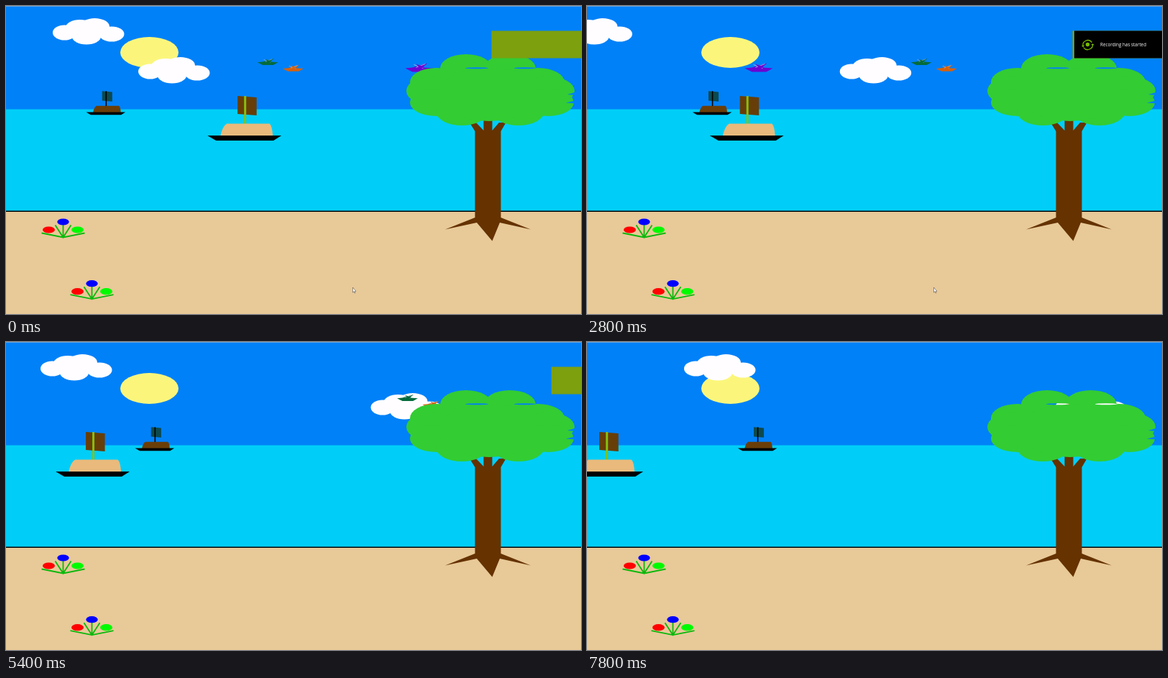
Write an HTML page that moves like this. It is 800 by 428 pixels and loops after 8000 ms.

```html
<!DOCTYPE html>
<html lang="en">
<head>
<meta charset="utf-8">
<title>Seaside</title>
<style>
  html, body { margin: 0; width: 100%; height: 100%; overflow: hidden; }
  svg { display: block; width: 100vw; height: 100vh; }
  .label { font: 6.3px "Open Sans", "Noto Sans", sans-serif; fill: #fff; }
</style>
</head>
<body>
<svg viewBox="0 0 800 428" preserveAspectRatio="none">
  <defs>
    <g id="cloud" fill="#fffdff">
      <ellipse cx="16.5" cy="37" rx="16.5" ry="10.5"/>
      <ellipse cx="38" cy="30" rx="20" ry="11"/>
      <ellipse cx="58.5" cy="28.5" rx="20.5" ry="11.5"/>
      <ellipse cx="82" cy="39" rx="17.5" ry="10.5"/>
      <ellipse cx="47" cy="42.5" rx="20" ry="11"/>
    </g>
    <!-- Colours: fill = sail and cabin come from custom properties -->
    <g id="boat">
      <path d="M42 -62 L68.5 -60 V-35 L42 -37Z" fill="var(--sail)"/>
      <path d="M52.5 -62 V-23" stroke="var(--mast)" stroke-width="3"/>
      <path d="M18 -6 Q21 -20 27 -23.5 H86 Q90 -22 91 -6Z" fill="var(--cabin)"/>
      <path d="M0 -7 H103 L92 0 H12Z"/>
    </g>
    <g id="bird">
      <path d="M0 7 L10 6 L31 0 L24 6 L39 7 L30 12 H10Z" fill="currentColor"/>
      <path d="M12 2 L25 7 M15 6 L28 1" stroke="#c9c0dc" stroke-width="1" opacity=".75"/>
      <path d="M15 1 L27 6 L20 7Z" fill="currentColor"/>
    </g>
    <g id="flowers">
      <path d="M-30 -6 L0 0 L30 -6 M-11 -17 L0 0 L11 -17 M0 0 V-20" fill="none" stroke="#0cb80c" stroke-width="1.8"/>
      <ellipse cx="-20" cy="-10.5" rx="8.5" ry="4.6" fill="#f00"/>
      <ellipse cy="-21.5" rx="8.2" ry="4.6" fill="#00f"/>
      <ellipse cx="20" cy="-10.5" rx="8.5" ry="4.6" fill="#00fa00"/>
    </g>
    <mask id="gaps" maskUnits="userSpaceOnUse" x="540" y="50" width="260" height="130">
      <rect x="540" y="50" width="260" height="130" fill="#fff"/>
      <ellipse cx="655" cy="86.3" rx="16" ry="1"/>
      <ellipse cx="722" cy="86.3" rx="15" ry="1"/>
      <path d="M793 119.5 L781 123 L793 124Z M793 131 L779 134.5 L793 135.5Z"/>
    </mask>
  </defs>

  <rect width="800" height="144" fill="#0081f8"/>
  <rect width="800" height="1" fill="#68a5dc"/>
  <rect y="143.5" width="800" height="142" fill="#00cef8"/>
  <rect y="285" width="800" height="143" fill="#e8c998"/>
  <path d="M0 285.2 H800" stroke="#000" stroke-width="1.6"/>

  <ellipse cx="199.5" cy="64.5" rx="40.5" ry="21.5" fill="#fbf67b"/>
  <use id="cloudLeft" href="#cloud"/>
  <use id="cloudRight" href="#cloud"/>
  <use id="boatFar" href="#boat" style="--sail:#0d4a4e;--mast:#000;--cabin:#6b3e08"/>
  <use id="boatNear" href="#boat" style="--sail:#673e08;--mast:#86c010;--cabin:#e9ba7c"/>
  <use id="birdGreen" href="#bird" color="#046b3c"/>
  <use id="birdOrange" href="#bird" color="#d8620c"/>
  <use id="birdPurple" href="#bird" color="#6c04d2"/>

  <path fill="#653200" d="M645 162 H654 L664.5 173 V155 H676.5 V173 L686 162 H695.5 L688.5 174 V294
    L730 310.5 L687 301 L676.5 326.5 L655 301 L611 310.5 L652.5 294 V174Z"/>
  <g id="leaves" fill="#33cc33" mask="url(#gaps)"></g>

  <use href="#flowers" x="79.5" y="321.5"/>
  <use href="#flowers" x="119.5" y="407.2"/>

  <path id="pointer" d="M482.5 391 V398 L484 396.7 L485 399 L486 398.5 L485 396.3 H486.8Z"
    fill="#fff" stroke="#333" stroke-width=".5"/>

  <g id="notice">
    <rect x="675.5" y="34.5" width="125" height="38" fill="#7da00f"/>
    <g id="noticePanel">
      <rect x="678" y="34.5" width="124" height="38"/>
      <g fill="none" stroke="#76b900" stroke-width="1.3">
        <path d="M690 56 A7 7 0 0 1 702.5 50.5 M703.5 52.5 A7 7 0 0 1 691 57.8"/>
      </g>
      <path d="M701.5 53 H705.5 L703.5 55.5Z M688 55 L692 54.5 L690.5 57.5Z" fill="#76b900"/>
      <circle cx="696.5" cy="53.5" r="2.7" fill="#76b900"/>
      <text class="label" x="714" y="56.2">Recording has started</text>
    </g>
  </g>
</svg>

<script>
const LOOP = 8, STEP = 0.2;
const el = id => document.getElementById(id);

const leaves = [
  [640, 87, 36, 20], [701, 87, 36, 20], [599, 106, 37, 20], [740, 106, 37, 20],
  [593, 118, 36, 20], [754, 118, 37, 20], [599, 134, 37, 19], [754, 134, 36, 19],
  [634, 146, 36, 20], [713, 146, 36, 20], [672, 123, 70, 37]
];
el("leaves").innerHTML = leaves.map(([x, y, rx, ry]) =>
  `<ellipse cx="${x}" cy="${y}" rx="${rx}" ry="${ry}"/>`).join("");

const place = (id, x, y, scale = 1) =>
  el(id).setAttribute("transform", `translate(${x} ${y}) scale(${scale})`);
const show = (id, visible) => el(id).setAttribute("visibility", visible ? "visible" : "hidden");
const progress = (t, start, end) => Math.min(1, Math.max(0, (t - start) / (end - start)));

function draw(t) {
  // The left cloud turns back once it has drifted partly off the stage.
  place("cloudLeft", -41.4 + 36.25 * Math.abs(t - 2.934), 0);
  place("cloudRight", 184 + 59.9 * t, 54);
  place("boatFar", 111.5 + 12.6 * t, 151.2, 0.53);
  place("boatNear", 280.2 - 39.1 * t, 187);
  place("birdGreen", 349.7 + 36 * t, 73, 0.74);
  place("birdOrange", 385 + 36 * t, 81.8, 0.74);
  place("birdPurple", 555.5 - 120 * t, 79.5);

  const hidden = 1 - progress(t, 0, 0.3) + progress(t, 4.9, 5.2);
  place("noticePanel", 125 * hidden, 0);
  place("notice", 125 * progress(t, 5.2, 5.5), 0);
  show("notice", t < 5.5);
  show("pointer", t < 4.75);
}

const start = performance.now();
function tick() {
  const t = ((performance.now() - start) / 1000) % LOOP;
  draw(Math.floor(t / STEP + 1e-6) * STEP);
  requestAnimationFrame(tick);
}
tick();
</script>
</body>
</html>
```
